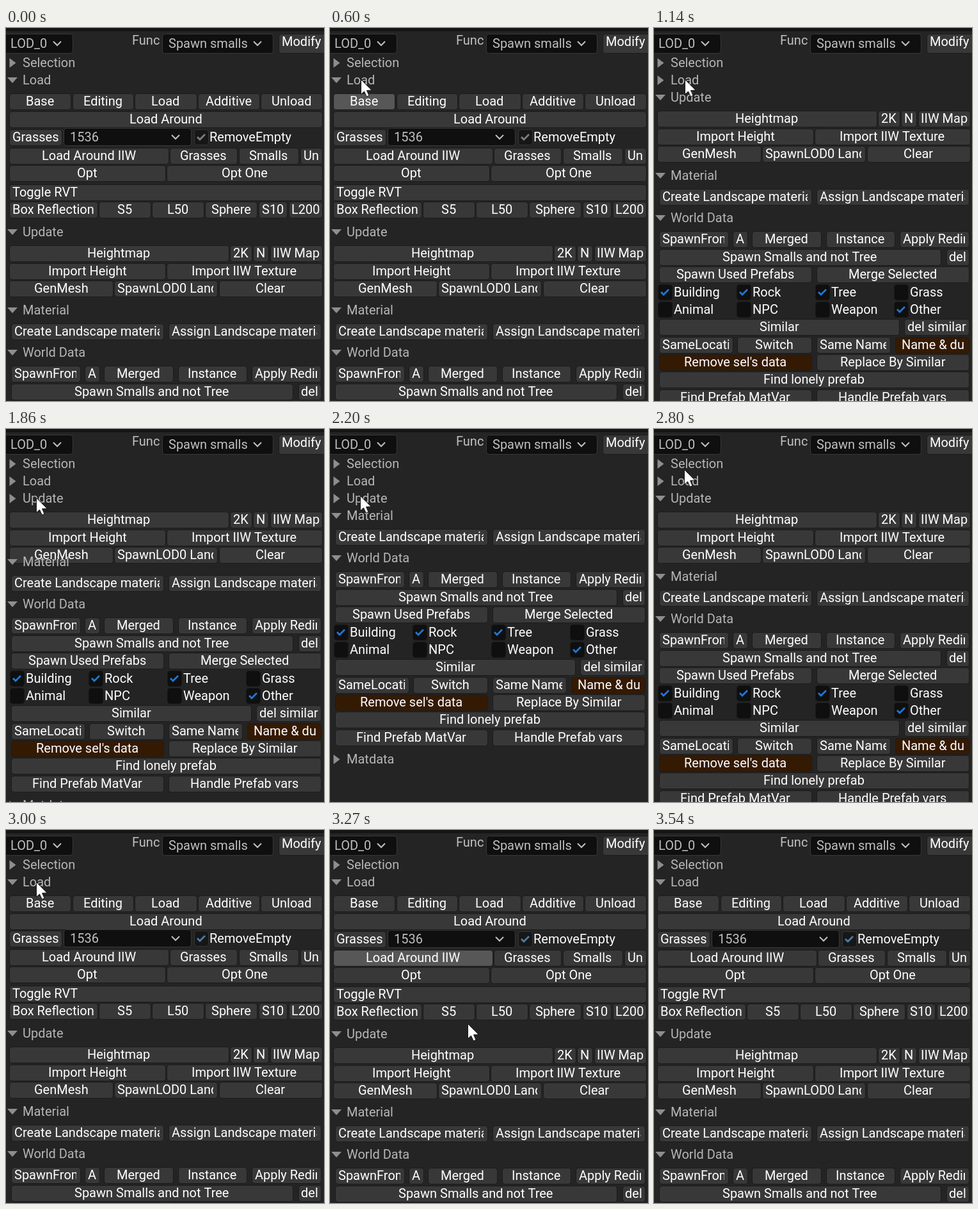
Animation, 497 px wide and 582 px high, one loop 4 s. Source, as an HTML page with a canvas:

```html
<!DOCTYPE html>
<html lang="en">
<head>
<meta charset="utf-8">
<title>Tool panel</title>
<style>
html, body { margin: 0; width: 100%; height: 100%; overflow: hidden; background: #242424; }
canvas { display: block; }
</style>
</head>
<body>
<canvas id="stage" width="497" height="582"></canvas>
<script>
const ctx = document.getElementById('stage').getContext('2d');
const W = 497, H = 582, LOOP = 4000, FPS = 15;
const FILL = '#383838', HOVER = '#575757', BROWN = '#351a03', DARK = '#0f0f0f';
const LOAD_H = 210, UPDATE_H = 95;

// Rows: [centre y, [x0, x1, label, style], ...], measured with every section open.
const loadRows = [
  [114, [5, 101, 'Base'], [104, 199, 'Editing'], [201, 298, 'Load'], [300, 396, 'Additive'], [398, 494, 'Unload']],
  [142, [5, 494, 'Load Around']],
  [170, [5, 87, 'Grasses'], [90, 290, '1536', 'combo'], [294, 317, 'RemoveEmpty', 'soft']],
  [199, [5, 254, 'Load Around IIW'], [256, 361, 'Grasses'], [364, 457, 'Smalls'], [460, 494, 'Un']],
  [226, [5, 249, 'Opt'], [251, 494, 'Opt One']],
  [256, [5, 494, 'Toggle RVT', 'left']],
  [283, [5, 143, 'Box Reflection'], [145, 226, 'S5'], [228, 309, 'L50'], [311, 392, 'Sphere'], [395, 439, 'S10'], [442, 494, 'L200']]
];
const updateRows = [
  [351, [5, 348, 'Heightmap'], [350, 384, '2K'], [386, 410, 'N'], [413, 494, 'IIW Map']],
  [379, [5, 249, 'Import Height'], [251, 494, 'Import IIW Texture']],
  [406, [5, 167, 'GenMesh'], [169, 330, 'SpawnLOD0 Land'], [333, 494, 'Clear']]
];
const materialRows = [
  [473, [8, 246, 'Create Landscape material'], [254, 492, 'Assign Landscape material']]
];
const worldRows = [
  [539, [8, 116, 'SpawnFrom'], [123, 146, 'A'], [153, 261, 'Merged'], [269, 376, 'Instance'], [384, 492, 'Apply Redirect']],
  [567, [8, 448, 'Spawn Smalls and not Tree'], [457, 492, 'del']],
  [594, [8, 246, 'Spawn Used Prefabs'], [254, 492, 'Merge Selected']],
  [622, [6, 29, 'Building', 'on'], [129, 152, 'Rock', 'on'], [252, 275, 'Tree', 'on'], [375, 398, 'Grass', 'off']],
  [649, [6, 29, 'Animal', 'off'], [129, 152, 'NPC', 'off'], [252, 275, 'Weapon', 'off'], [375, 398, 'Other', 'on']],
  [676, [8, 383, 'Similar'], [391, 492, 'del similar']],
  [703.5, [8, 123, 'SameLocation'], [130, 246, 'Switch'], [254, 369, 'Same Name'], [377, 492, ' Name & dup', 'brown']],
  [731, [8, 246, "Remove sel's data", 'brown'], [254, 492, 'Replace By Similar']],
  [758, [8, 492, 'Find lonely prefab']],
  [786, [8, 246, 'Find Prefab MatVar'], [254, 492, 'Handle Prefab vars']]
];

// Pointer stops: [step, x, y]; a stop without x hides the pointer.
const path = [
  [0], [4, 420, 572], [5, 318, 430], [6, 215, 308], [7, 126, 196], [8, 68, 116], [9, 48, 80],
  [12, 48, 63], [14, 48, 80], [22, 48, 86], [23, 47, 98], [24, 47, 107], [33, 47, 104],
  [36, 47, 99], [40, 47, 90], [41, 47, 75], [42, 47, 63], [44, 47, 76], [45, 47, 81],
  [47, 62, 106], [48, 125, 192], [49, 215, 302], [50, 318, 428], [51, 410, 533], [52, 440, 568], [53]
];

const easeOut = a => 1 - Math.pow(1 - Math.min(1, Math.max(0, a)), 3);
let now, pointer, lastPointer;

function box(x, y, w, h, fill, line) {
  ctx.beginPath();
  ctx.roundRect(x + .5, y + .5, w - 1, h - 1, 4);
  ctx.fillStyle = fill;
  ctx.fill();
  ctx.strokeStyle = line;
  ctx.lineWidth = 1;
  ctx.stroke();
}

// Text sits on whole pixels.
function text(s, x, y, color) {
  ctx.fillStyle = color;
  ctx.fillText(s, Math.round(x), y + 7);
}

function polyline(points, color, width) {
  ctx.beginPath();
  points.forEach(p => ctx.lineTo(p[0], p[1]));
  ctx.strokeStyle = color;
  ctx.lineWidth = width;
  ctx.stroke();
}

function polygon(points, color) {
  ctx.beginPath();
  points.forEach(p => ctx.lineTo(p[0], p[1]));
  ctx.closePath();
  ctx.fillStyle = color;
  ctx.fill();
}

function chevron(x, y) {
  polyline([[x - 6, y - 3], [x, y + 3], [x + 6, y - 3]], '#c0c0c0', 2);
}

function combo(x0, x1, y, h, label) {
  box(x0, Math.round(y - h / 2), x1 - x0, h, DARK, '#383838');
  text(label, x0 + 10, y, '#c0c0c0');
  chevron(x1 - 25, y);
}

function checkbox(x, y, label, style) {
  const soft = style === 'soft';
  box(x, y - 12, 23, 25, soft ? '#171717' : DARK, soft ? '#343434' : '#171717');
  if (style !== 'off') {
    const color = soft ? (now < 44 ? '#7b7f83' : '#4b7cab') : '#1f78d8';
    polyline([[x + 5, y], [x + 9, y + 4], [x + 17, y - 4]], color, 2.8);
  }
  text(label, x + (soft ? 24 : 25), y, '#fff');
}

function button(x0, x1, y, label, style) {
  const p = lastPointer;
  const hot = pointer && p && p[0] >= x0 && p[0] < x1 && p[1] >= y - 12 && p[1] < y + 13;
  box(x0, y - 12, x1 - x0 + 1, 26, style === 'brown' ? BROWN : hot ? HOVER : FILL, '#1b1b1b');
  const room = x1 - x0 - 10, w = ctx.measureText(label).width;
  const left = style === 'left' || w > room + 3;
  ctx.save();
  if (left) {
    ctx.beginPath();
    ctx.rect(x0 + 4, y - 12, room, 25);
    ctx.clip();
  }
  text(label, left ? x0 + 5 : (x0 + x1 - w) / 2, y, '#fff');
  ctx.restore();
}

function rows(list, shift) {
  for (const [cy, ...cells] of list) {
    const y = Math.round(cy + (typeof shift === 'function' ? shift(cy) : shift));
    if (y > H + 15) continue;
    for (const [x0, x1, label, style] of cells) {
      if (style === 'combo') combo(x0, x1, y, 28, label);
      else if (['on', 'off', 'soft'].includes(style)) checkbox(x0, y, label, style);
      else button(x0, x1, y, label, style);
    }
  }
}

function header(label, cy, open) {
  const y = Math.round(cy);
  polygon(open ? [[2, y - 4], [18, y - 4], [10, y + 5]] : [[5.5, y - 7], [15.5, y + .5], [5.5, y + 8]], '#8e8e8e');
  text(label, 26, y, '#b6b6b6');
}

function toolbar() {
  ctx.fillStyle = '#151515';
  ctx.fillRect(0, 0, W, 5);
  combo(-3, 105, 24, 31, 'LOD_0');
  text('Func', 197, 19, '#c0c0c0');
  combo(244, 418, 24, 31, 'Spawn smalls');
  box(426, 9, 80, 31, FILL, '#1b1b1b');
  text('Modify', 431, 21, '#fff');
}

function arrow([x, y]) {
  const shape = [[0, 0], [0, 23], [5, 18.5], [8.8, 26.6], [12.5, 25], [9, 17], [16.6, 16.5]]
    .map(p => [p[0] + x + .5, p[1] + y + .5]);
  polygon(shape, '#fff');
  polyline([...shape, shape[0]], '#1a1a1a', 1);
}

function draw(t) {
  now = Math.floor((t + 7) * FPS / 1000);
  let i = path.length - 1;
  while (path[i][0] > now) i--;
  const spot = n => n >= 0 && path[n].length > 1 ? path[n].slice(1) : null;
  pointer = spot(i);
  lastPointer = spot(i - 1);

  const load = now < 17 ? 1 : easeOut((now - 43) * .405);
  const update = now < 37 ? easeOut(1 - (now - 26.27) * .36) : easeOut((now - 37.03) * .4);
  const a = -(1 - load) * LOAD_H;
  const b = a - (1 - update) * UPDATE_H;

  ctx.fillStyle = '#242424';
  ctx.fillRect(0, 0, W, H);
  ctx.font = '20px Roboto, sans-serif';
  toolbar();
  header('Selection', 54, false);
  header('Load', 81, now < 17 || now >= 44);
  if (load > 0) rows(loadRows, y => -Math.min(1.4, (1 - load) * (y - 81)));
  header('Update', 318 + a, now < 27 || now >= 38);
  if (update > 0) rows(updateRows, a);
  header('Material', 440 + b, true);
  rows(materialRows, b);
  header('World Data', 506 + b, true);
  rows(worldRows, b);
  header('Matdata', 820 + b, false);
  if (pointer) arrow(pointer);
}

const start = performance.now();
function tick() {
  draw((performance.now() - start) % LOOP);
  requestAnimationFrame(tick);
}
tick();
</script>
</body>
</html>
```
